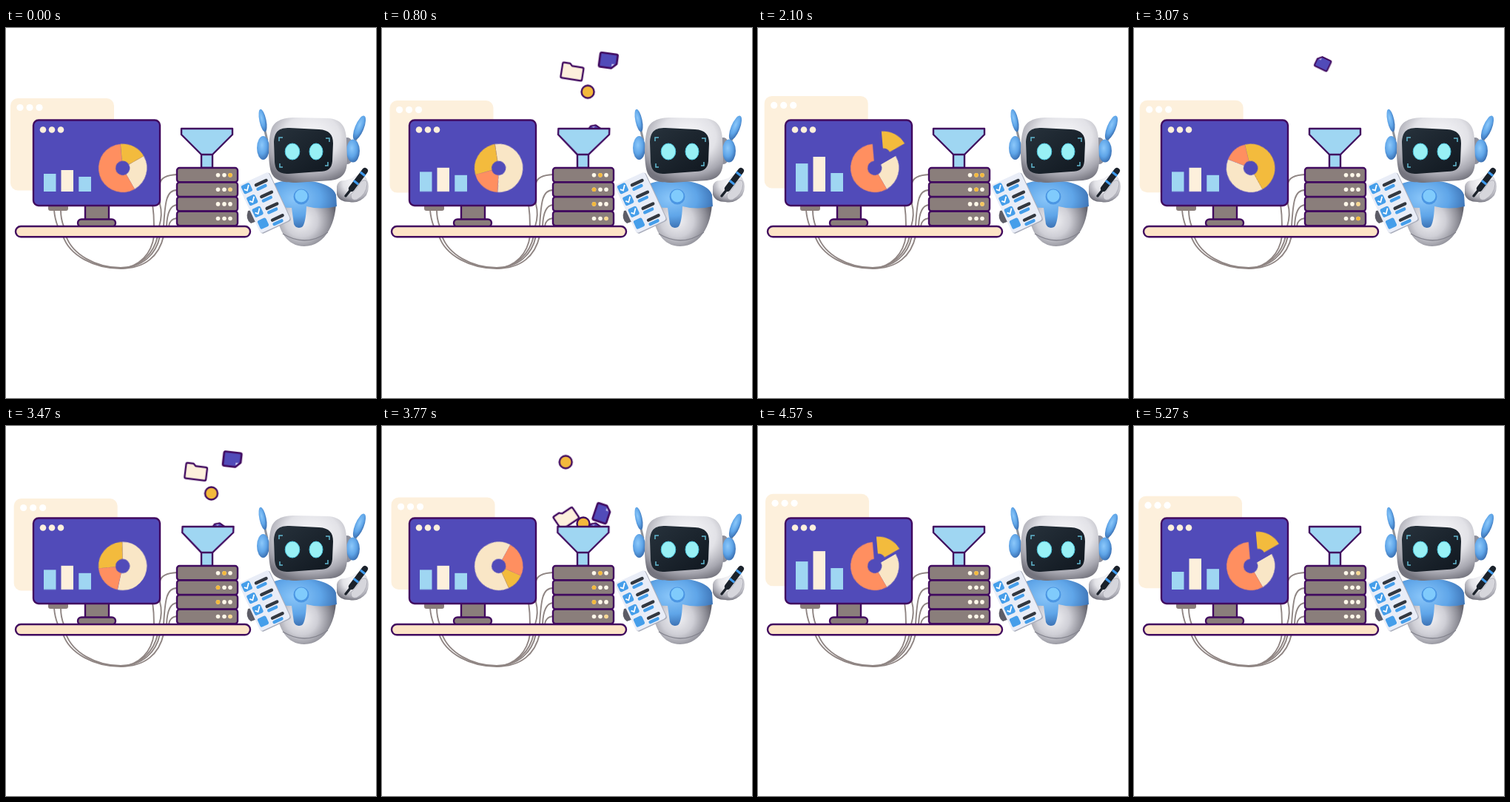
An HTML page without scripts that plays this animation: 500x500 px, repeating every 5310 ms.

```html
<!DOCTYPE html>
<html lang="en">
<head>
<meta charset="utf-8">
<title>Data pipeline</title>
<style>
  html, body { margin: 0; width: 100%; height: 100%; overflow: hidden; background: #fff; }
  svg { display: block; width: 100vw; height: 100vh; }
  :root { --loop: 2.655s; }
  .line { stroke: #410a5f; stroke-width: 2.4; stroke-linejoin: round; }
  .grey { fill: #8a7e7b; }
  .blue { fill: #9fd6f2; }
  .cream { fill: #fdf0dc; }
  .gold { fill: #f3b93c; }
  .violet { fill: #514bb9; }
  .cable { fill: none; stroke: #8f8583; stroke-width: 1.9; }

  .bar {
    transform-box: fill-box; transform-origin: 50% 100%;
    animation: grow var(--loop) linear infinite;
  }
  @keyframes grow {
    0%, 50%, 64% { transform: scaleY(1); }
    15%, 42% { transform: scaleY(1.11); }
    72.1% { transform: scaleY(var(--a)); }
    79.1% { transform: scaleY(var(--b)); }
    98.5% { transform: scaleY(var(--c)); }
    100% { transform: scaleY(1); }
  }

  /* the slices turn and change share, then one slides out */
  .slice { fill: none; stroke-width: 23; animation: var(--turn) var(--loop) linear infinite; }
  @keyframes yellow {
    0% { transform: rotate(-95deg); stroke-dasharray: 65 360; }
    15.6% { transform: rotate(-105deg); stroke-dasharray: 165 360; }
    42% { transform: rotate(383deg); stroke-dasharray: 42 360; }
    50.1% { transform: rotate(522deg); stroke-dasharray: 28 360; animation-timing-function: ease-out; }
    69%, 100% { transform: rotate(625deg); stroke-dasharray: 65 360; }
  }
  @keyframes pale {
    0% { transform: rotate(-30deg); stroke-dasharray: 90 360; }
    15.6% { transform: rotate(60deg); stroke-dasharray: 140 360; }
    42% { transform: rotate(425deg); stroke-dasharray: 233 360; }
    50.1% { transform: rotate(550deg); stroke-dasharray: 220 360; animation-timing-function: ease-out; }
    69%, 100% { transform: rotate(690deg); stroke-dasharray: 90 360; }
  }
  @keyframes orange {
    0% { transform: rotate(60deg); stroke-dasharray: 205 360; }
    15.6% { transform: rotate(200deg); stroke-dasharray: 55 360; }
    42% { transform: rotate(658deg); stroke-dasharray: 85 360; }
    50.1% { transform: rotate(770deg); stroke-dasharray: 112 360; animation-timing-function: ease-out; }
    69%, 100% { transform: rotate(780deg); stroke-dasharray: 205 360; }
  }
  .pull { animation: pull var(--loop) linear infinite; }
  @keyframes pull {
    0%, 69% { transform: none; }
    72.1% { transform: translate(5px, -7px); }
    79.1% { transform: translate(12px, -17px); }
    98.5% { transform: translate(10px, -14px); }
    100% { transform: none; }
  }

  .drop {
    animation: drop var(--loop) linear infinite;
    animation-delay: calc(var(--at) - var(--loop));
  }
  @keyframes drop {
    0% {
      transform: translate(var(--x0), 42px) rotate(var(--r0)); opacity: 1;
      animation-timing-function: cubic-bezier(.333, 0, .667, .333);
    }
    15.1%, 60% { transform: translate(var(--x), var(--y)) rotate(var(--r)); opacity: 1; }
    60.1%, 100% { transform: translate(var(--x), var(--y)) rotate(var(--r)); opacity: 0; }
  }
  .sink { transform-origin: 271px 162px; animation: sink var(--loop) linear infinite; }
  @keyframes sink {
    0%, 54.5% { transform: none; animation-timing-function: ease-in; }
    69.5%, 100% { transform: scale(0); }
  }

  .funnel { transform-origin: 271px 171px; animation: sway var(--loop) ease-in-out infinite; }
  @keyframes sway {
    0%, 27%, 60%, 100% { transform: none; }
    31% { transform: skewX(-2.5deg); }
    36% { transform: skewX(2deg); }
    42% { transform: skewX(-.7deg); }
    46% { transform: skewX(1.5deg); }
    50.1% { transform: skewX(-2.6deg); }
    55% { transform: skewX(1.5deg); }
  }
</style>
</head>
<body>
<svg viewBox="0 0 500 500">
  <defs>
    <radialGradient id="shell" cx=".55" cy=".3" r=".72">
      <stop offset="0" stop-color="#fafafc"/>
      <stop offset=".5" stop-color="#e2e2e7"/>
      <stop offset=".8" stop-color="#a8a8b1"/>
      <stop offset="1" stop-color="#74747e"/>
    </radialGradient>
    <radialGradient id="belly" cx=".46" cy=".6" r=".56">
      <stop offset="0" stop-color="#f3f3f6"/>
      <stop offset=".45" stop-color="#cfcfd6"/>
      <stop offset=".8" stop-color="#8c8c95"/>
      <stop offset="1" stop-color="#5f5f69"/>
    </radialGradient>
    <radialGradient id="sky" cx=".4" cy=".38" r=".68">
      <stop offset="0" stop-color="#8cc8fa"/>
      <stop offset=".55" stop-color="#5fa5e8"/>
      <stop offset="1" stop-color="#3568aa"/>
    </radialGradient>
    <linearGradient id="glass" x1="0" y1="0" x2="1" y2="1">
      <stop offset="0" stop-color="#27323c"/>
      <stop offset="1" stop-color="#10171f"/>
    </linearGradient>
    <g id="doc" class="line">
      <path class="violet" d="M-9-9Q-9-11-7-11H3L9-5V9Q9 11 7 11H-7Q-9 11-9 9Z"/>
      <path d="M3.500-8.500V-5H7Z" fill="#c9c7ee" stroke="none"/>
    </g>
    <path id="folder" class="cream line" d="M-15-8Q-15-10-13-10H-5L-2-7H12Q14-7 14-5V9Q14 11 12 11H-13Q-15 11-15 9Z"/>
    <circle id="coin" class="line gold" r="8.5"/>
    <g id="server">
      <rect class="grey line" x="231" y="189" width="82" height="19.3" rx="3.5"/>
      <g fill="#fff8ea">
        <circle cx="286.5" cy="198.7" r="2.8"/><circle cx="295" cy="198.7" r="2.8"/><circle cx="303" cy="198.7" r="2.8"/>
      </g>
    </g>
    <g id="row" stroke-linecap="round" stroke-width="4.4">
      <rect x="2.5" y="2" width="12.5" height="12.5" rx="2.5" fill="#459eea"/>
      <path d="M22 9.500H37" stroke="#333840"/>
      <path d="M22 15.500H33" stroke="#459eea"/>
    </g>
    <path id="tick" d="M5 8 8 11 13 5" fill="none" stroke="#fff" stroke-width="1.8"/>
  </defs>

  <!-- back window -->
  <g>
    <animateMotion dur="2.655s" repeatCount="indefinite" calcMode="linear"
      path="M-3.5 0A3.5 3.2 0 0 0 3.5 0A3.5 3.2 0 0 0-3.5 0"/>
    <rect class="cream" x="9.5" y="95" width="140" height="124.5" rx="10"/>
    <g fill="#fff">
      <circle cx="22.5" cy="107.5" r="4.6"/><circle cx="35.5" cy="107.5" r="4.6"/><circle cx="48.5" cy="107.5" r="4.6"/>
    </g>
  </g>

  <!-- cables -->
  <g class="cable">
    <path d="M65 246Q66 258 70 268M74 246Q74 258 78 268"/>
    <path d="M77 281C86 308 120 325 155 325C188 325 207 308 213 281"/>
    <path d="M81 281C90 306 121 324 155 324C184 324 203 306 208 281"/>
    <path d="M155 325C181 323 197 304 200 281M155 325C183 323 200 304 205 281"/>
    <path d="M198 238Q200 252 200 268M231 198Q210 199 208 210V238Q212 252 207 268"/>
    <path d="M231 219C217 219 215 234 213 268M231 239Q218 240 217 268M231 257Q221 258 220 268"/>
  </g>

  <!-- monitor -->
  <rect class="grey" x="57" y="239" width="27" height="8" rx="3"/>
  <rect class="grey line" x="107" y="238" width="32" height="24"/>
  <rect class="grey line" x="97" y="258.5" width="51" height="10" rx="5"/>
  <rect class="violet line" x="37" y="124.5" width="171" height="115.5" rx="7"/>
  <g class="cream">
    <circle cx="50" cy="137.5" r="4.3"/><circle cx="62" cy="137.5" r="4.3"/><circle cx="74" cy="137.5" r="4.3"/>
  </g>
  <rect class="bar blue" x="51" y="197" width="16.5" height="24" style="--a:1.58;--b:1.58;--c:1"/>
  <rect class="bar cream" x="74.5" y="192" width="16.5" height="29" style="--a:1.79;--b:1.62;--c:1.45"/>
  <rect class="bar blue" x="98.3" y="201" width="16.7" height="20" style="--a:1.45;--b:1.25;--c:1.4"/>
  <g transform="translate(157.7 189.3)">
    <circle class="slice" r="21.2" pathLength="360" stroke="#f9e6c6" style="--turn:pale"/>
    <circle class="slice" r="21.2" pathLength="360" stroke="#ff8f60" style="--turn:orange"/>
    <g class="pull">
      <circle class="slice" r="21.2" pathLength="360" stroke="#f3bb3d" style="--turn:yellow"/>
    </g>
  </g>
  <rect class="line" x="13" y="268" width="317" height="14.3" rx="7" fill="#fde4c6"/>

  <!-- falling files -->
  <g class="sink">
    <g class="drop" style="--at:.318s;--x0:253px;--x:288px;--y:140px;--r0:-65deg;--r:-55deg"><use href="#doc" transform="scale(.85)"/></g>
    <g class="drop" style="--at:.52s;--x0:284px;--x:272px;--y:132px;--r0:0deg;--r:0deg"><use href="#coin"/></g>
    <g class="drop" style="--at:.62s;--x0:260px;--x:249px;--y:123px;--r0:20deg;--r:-34deg"><use href="#folder"/></g>
    <g class="drop" style="--at:.739s;--x0:306px;--x:296px;--y:128px;--r0:100deg;--r:8deg"><use href="#doc" transform="scale(1.08)"/></g>
    <g class="drop" style="--at:1s;--x0:246.5px;--x:267px;--y:122px;--r0:0deg;--r:0deg"><use href="#coin"/></g>
  </g>

  <!-- funnel and servers -->
  <rect class="blue line" x="264" y="170" width="15" height="19"/>
  <path class="funnel blue line" d="M237 136H306V144L279 171H264L237 144Z"/>
  <use href="#server"/>
  <use href="#server" y="19.6"/>
  <use href="#server" y="39.2"/>
  <use href="#server" y="58.8"/>
  <g class="gold">
    <circle cx="286.5" cy="198.7" r="2.8"><animate attributeName="opacity" dur="2.655s" repeatCount="indefinite" calcMode="discrete" keyTimes="0;.46;.6" values="0;1;0"/></circle>
    <circle cx="295" cy="198.7" r="2.8"><animate attributeName="opacity" dur="2.655s" repeatCount="indefinite" calcMode="discrete" keyTimes="0;.3;.46;.6;.92" values="0;1;0;1;0"/></circle>
    <circle cx="303" cy="198.7" r="2.8"><animate attributeName="opacity" dur="2.655s" repeatCount="indefinite" calcMode="discrete" keyTimes="0;.1;.46;.6;.75;.92" values="1;0;1;0;1;.5"/></circle>
    <circle cx="286.5" cy="218.3" r="2.8"><animate attributeName="opacity" dur="2.655s" repeatCount="indefinite" calcMode="discrete" keyTimes="0;.3;.46" values="0;1;0"/></circle>
    <circle cx="295" cy="218.3" r="2.8"><animate attributeName="opacity" dur="2.655s" repeatCount="indefinite" calcMode="discrete" keyTimes="0;.75;.92" values="0;1;0"/></circle>
    <circle cx="303" cy="218.3" r="2.8"><animate attributeName="opacity" dur="2.655s" repeatCount="indefinite" calcMode="discrete" keyTimes="0;.1" values=".6;0"/></circle>
    <circle cx="286.5" cy="237.9" r="2.8"><animate attributeName="opacity" dur="2.655s" repeatCount="indefinite" calcMode="discrete" keyTimes="0;.3;.46" values="0;1;0"/></circle>
    <circle cx="303" cy="237.9" r="2.8"><animate attributeName="opacity" dur="2.655s" repeatCount="indefinite" calcMode="discrete" keyTimes="0;.1;.3;.46;.6;.75;.92" values="0;.5;0;1;0;.8;0"/></circle>
    <circle cx="286.5" cy="257.5" r="2.8"><animate attributeName="opacity" dur="2.655s" repeatCount="indefinite" calcMode="discrete" keyTimes="0;.46;.6" values="0;1;0"/></circle>
    <circle cx="303" cy="257.5" r="2.8"><animate attributeName="opacity" dur="2.655s" repeatCount="indefinite" calcMode="discrete" keyTimes="0;.1;.3;.46" values="0;1;.5;0"/></circle>
  </g>

  <!-- robot -->
  <g>
    <path d="M350 139 353 152M474 148 470 156" stroke="#8d929b" stroke-width="3"/>
    <ellipse cx="461" cy="166" rx="10" ry="18" fill="#8d8f9b"/>
    <g fill="url(#sky)">
      <ellipse cx="347" cy="125" rx="4.6" ry="15.5" transform="rotate(-12 347 125)"/>
      <ellipse cx="477.5" cy="135" rx="6" ry="17.5" transform="rotate(22 477.5 135)"/>
      <ellipse cx="347.5" cy="162" rx="8.5" ry="16"/>
      <ellipse cx="469" cy="166" rx="9" ry="15.5"/>
    </g>
    <path fill="#5c5c66" d="M327 247Q323 259 331 264L339 261 333 246Z"/>
    <path fill="url(#belly)" d="M359 222C365 203 438 202 446 226C448 262 432 295 403 295C380 295 368 274 366 250Z"/>
    <path fill="none" stroke="#85858f" stroke-width="1.3" d="M374 278Q405 297 435 276"/>
    <path fill="url(#sky)" d="M354 216C360 202 440 200 446 226L447 241Q426 246 406 241Q405 265 400 269Q392 272 389 265L386 243Q370 243 363 237Z"/>
    <circle cx="399" cy="228" r="10.5" fill="#4b96e3"/>
    <circle cx="399" cy="227" r="8.5" fill="#80cbfc"/>
    <path fill="url(#shell)" d="M358 139C361 126 373 121 391 121L435 122C453 123 459 133 460 149L461 178C461 196 455 204 439 206L392 209C373 209 362 206 358 194C354 181 354 153 358 139Z"/>
    <path fill="url(#glass)" d="M362 154C363 139 369 135 383 135L423 137C437 138 442 144 442 156L441 180C440 190 435 194 423 194L382 197C368 197 364 192 363 181Z"/>
    <g fill="#98f0f5" stroke="#4cc4dd">
      <ellipse cx="387" cy="167" rx="9.8" ry="11"/>
      <ellipse cx="419" cy="167" rx="9" ry="11"/>
    </g>
    <path fill="none" stroke="#62b8d0" stroke-width="1.5" d="M369 153V148H374M432 149H437V154M370 183V188H374M431 186H435V181"/>
    <path fill="url(#shell)" d="M447 214Q449 205 458 206L468 203Q480 193 487 203Q493 214 487 226Q477 238 464 235Q450 235 447 225Z"/>
    <g fill="none" stroke-linecap="round">
      <path stroke="#1b222b" stroke-width="8" d="M467 217 485 193"/>
      <path stroke="#1b222b" stroke-width="3.5" d="M459 227 467 217"/>
      <path stroke="#3f9aec" stroke-width="8" stroke-linecap="butt" d="M472 210 474 207.5M481 198.5 483 196"/>
    </g>
    <path fill="#d6d6dc" stroke="#a5a5af" stroke-width=".8" d="M466 225Q474 218 480 207Q488 203 488 211Q487 225 474 232Q466 234 466 225Z"/>
    <g transform="translate(314 213) rotate(-25)">
      <rect x=".5" y="1" width="45" height="72" rx="4" fill="#a9adbb"/>
      <rect width="44.5" height="71.5" rx="4" fill="#e9edf7"/>
      <use href="#row"/><use href="#row" y="17.4"/><use href="#row" y="34.8"/><use href="#row" y="52.2"/>
      <use href="#tick"/><use href="#tick" y="17.4"/><use href="#tick" y="34.8"/>
    </g>
  </g>
</svg>
</body>
</html>
```
